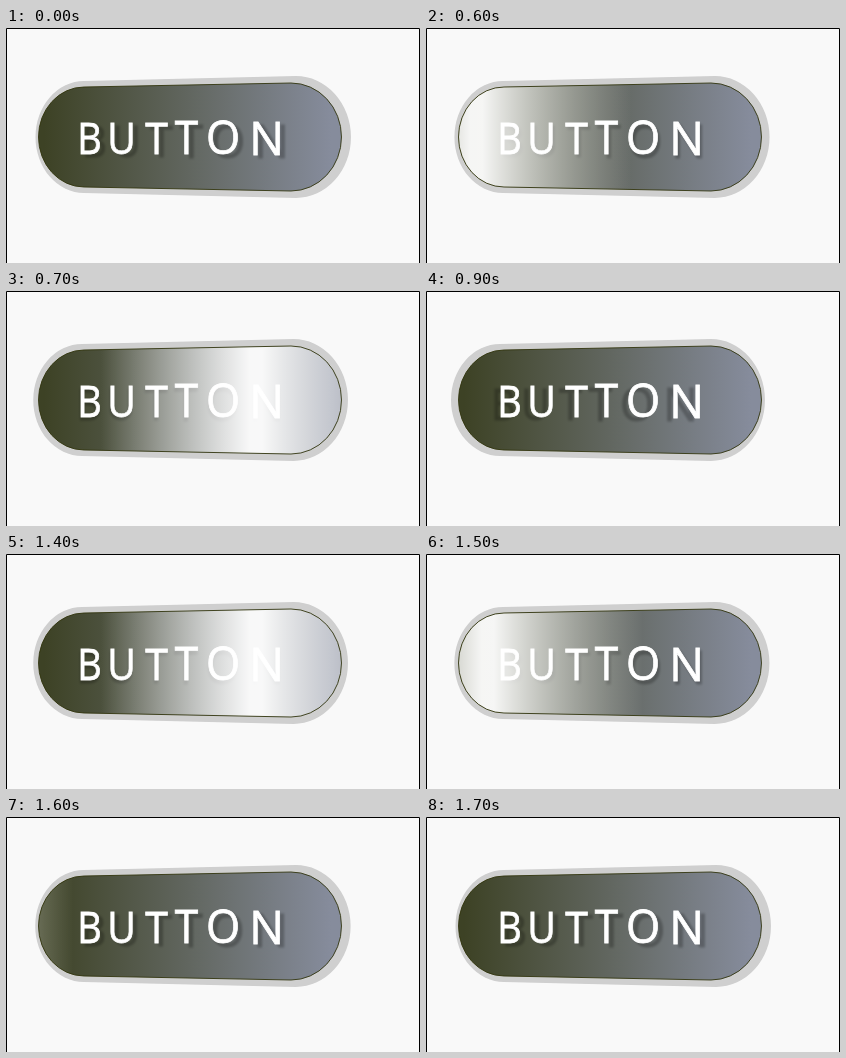
These frames come from a looping animation (414 by 235 pixels, 2.3 s). An HTML page:

```html
<!DOCTYPE html>
<html lang="en">
<head>
<meta charset="utf-8">
<title>Button</title>
<style>
  html, body { margin: 0; width: 100%; height: 100%; overflow: hidden; background: #f9f9f9; }
  svg { display: block; width: 414px; height: 235px; }
  text { font-family: "Open Sans", "Noto Sans", sans-serif; font-weight: 500; text-anchor: middle; }
  #shadow { fill: #000; stroke: #000; opacity: .24; filter: blur(1.3px); }
  #label { fill: #fff; stroke: #fff; stroke-width: .8px; }
</style>
</head>
<body>
<svg viewBox="0 0 414 235">
  <defs>
    <linearGradient id="base" gradientUnits="userSpaceOnUse" x1="38" x2="325">
      <stop stop-color="#3d4225"/>
      <stop offset=".5" stop-color="#61665f"/>
      <stop offset="1" stop-color="#868c9c"/>
    </linearGradient>
    <linearGradient id="glow">
      <stop stop-color="#fff" stop-opacity="0"/>
      <stop offset=".48" stop-color="#fff" stop-opacity=".95"/>
      <stop offset=".52" stop-color="#fff" stop-opacity=".95"/>
      <stop offset="1" stop-color="#fff" stop-opacity="0"/>
    </linearGradient>
    <clipPath id="inside"><path class="body"/></clipPath>
  </defs>
  <path id="rim" fill="#cfcfcf"/>
  <path class="body" fill="url(#base)"/>
  <g id="shadow"></g>
  <g id="label"></g>
  <rect id="shine" y="40" width="310" height="140" fill="url(#glow)" clip-path="url(#inside)"/>
  <path class="body" fill="none" stroke="#33360f" stroke-width=".9"/>
  <path d="M.5 235V.5H413.5V235" fill="none" stroke="#000"/>
</svg>
<script>
const LOOP = 2300, MID = 109;
const $ = id => document.getElementById(id);

// Pill seen in perspective: the right cap is nearer, so taller
const pill = (left, x1, x2, right, h1, h2) =>
  `M${x1} ${MID - h1}L${x2} ${MID - h2}` +
  `A${right - x2} ${h2} 0 0 1 ${x2} ${MID + h2}` +
  `L${x1} ${MID + h1}A${x1 - left} ${h1} 0 0 1 ${x1} ${MID - h1}Z`;

for (const p of document.querySelectorAll(".body"))
  p.setAttribute("d", pill(32.5, 78, 285, 335.5, 50, 54));

// Letters grow and turn less narrow towards the viewer
const centers = [83.5, 115.5, 150.5, 180.5, 217, 260.5];
const letters = [..."BUTTON"].map((c, i) => {
  const x = centers[i], near = (x - centers[0]) / 177;
  return `<text transform="translate(${x} ${125.5 + near}) scale(${.87 + .12 * near} 1)"
    font-size="${43.5 + 3 * near}">${c}</text>`;
}).join("");
$("shadow").innerHTML = $("label").innerHTML = letters;

// [start in ms, progress from resting (0) to turned (1)]
const steps = [
  [0, 0], [600, .24], [700, .5], [800, .78], [900, 1],
  [1400, .5], [1500, .255], [1600, .06], [1700, 0]
];

function draw(now) {
  const t = now % LOOP;
  const p = steps.findLast(s => s[0] <= t)[1];
  const mix = (a, b) => a + (b - a) * p;
  $("rim").setAttribute("d",
    pill(mix(29.5, 25), mix(78, 74), mix(290, 285), mix(345, 339), 56, 61));
  $("shadow").setAttribute("transform", `translate(${mix(5, -6)} 3.5)`);
  // The band of light sweeps across between the two poses
  $("shine").setAttribute("x", mix(-134, 634) - 155);
}

const start = performance.now();
function frame() {
  draw(performance.now() - start);
  requestAnimationFrame(frame);
}
frame();
</script>
</body>
</html>
```
